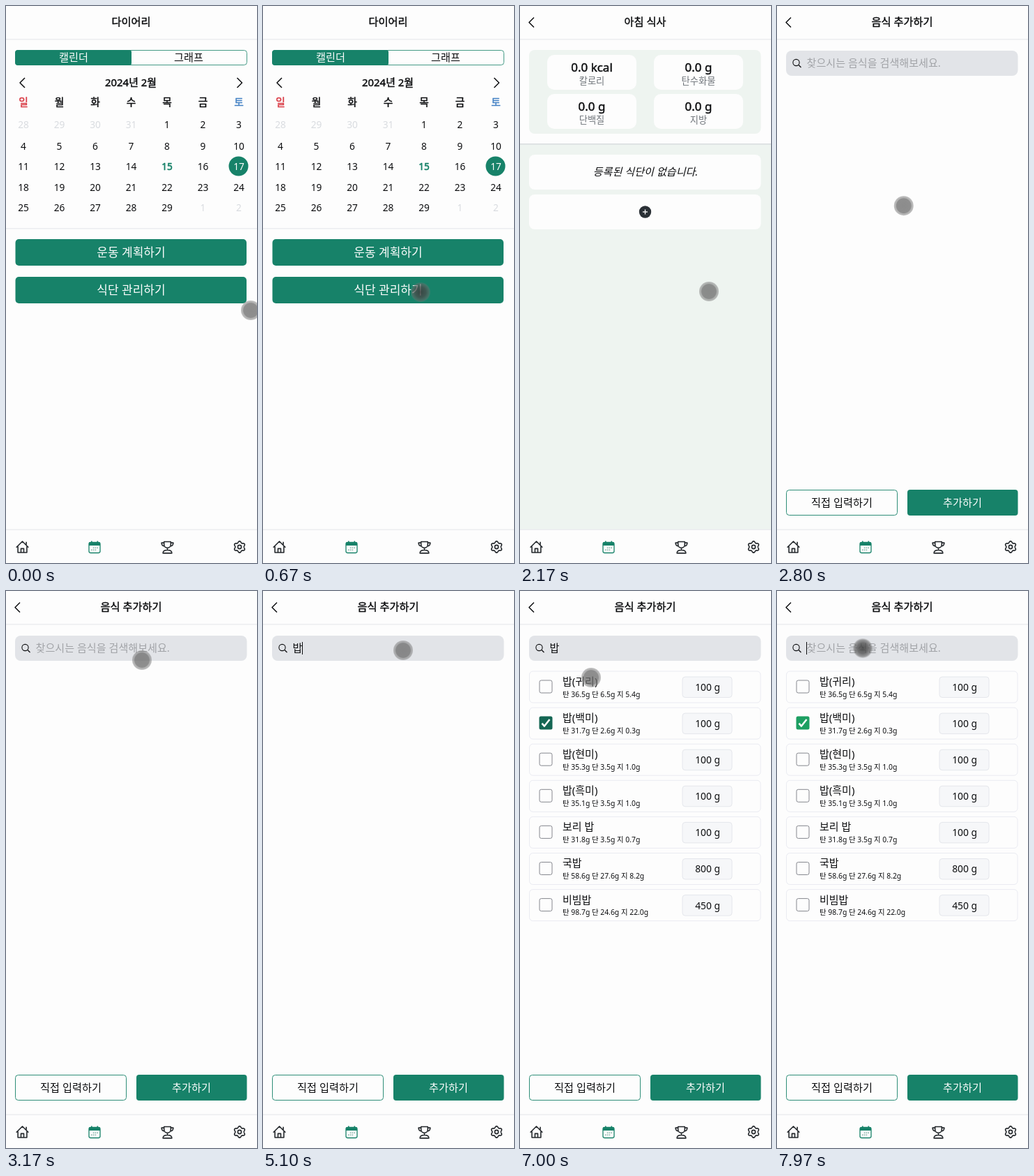
An HTML page with a canvas for the animation above (8 s loop, 360 by 798 pixels).

```html
<!DOCTYPE html>
<html lang="ko">
<head>
<meta charset="utf-8">
<title>다이어리</title>
<style>
html, body { margin: 0; width: 100%; height: 100%; overflow: hidden; background: #fdfdfd; }
canvas { display: block; width: 360px; height: 798px; }
</style>
</head>
<body>
<canvas id="stage"></canvas>
<script>
const W = 360, H = 798, LOOP = 8000;
const BG = '#fdfdfd', GREY = '#eef4f0', LINE = '#ecedf0', BAR = '#e1e4e6';
const GREEN = '#178269', INK = '#0d0e10', DARK = '#24282c', MUTED = '#6f747a';
const FONT = '"Noto Sans", "Noto Sans CJK KR", "Noto Sans CJK", sans-serif';
const canvas = document.getElementById('stage');
const c = canvas.getContext('2d');
const dpr = window.devicePixelRatio || 1;
canvas.width = W * dpr;
canvas.height = H * dpr;

// Text is placed by its visual centre line; `heavy` thickens the strokes by that many pixels.
function text(s, x, y, size, { color = INK, heavy = 0, align = 'center', style = '' } = {}) {
  c.font = `${style} ${size}px ${FONT}`;
  c.textAlign = align;
  c.fillStyle = c.strokeStyle = color;
  c.fillText(s, x, y + size * 0.36);
  if (heavy) {
    c.lineWidth = heavy;
    c.strokeText(s, x, y + size * 0.36);
  }
}
const SEMI = 0.45, BOLD = 0.6;

function box(x, y, w, h, r, fill, stroke, lw = 1) {
  c.beginPath();
  c.roundRect(x, y, w, h, r);
  if (fill) { c.fillStyle = fill; c.fill(); }
  if (stroke) { c.strokeStyle = stroke; c.lineWidth = lw; c.stroke(); }
}
function rect(x, y, w, h, color) {
  c.fillStyle = color;
  c.fillRect(x, y, w, h);
}
function disc(x, y, r, color) {
  c.beginPath();
  c.arc(x, y, r, 0, Math.PI * 2);
  c.fillStyle = color;
  c.fill();
}
function line(points, color = INK, lw = 1.5) {
  c.beginPath();
  points.forEach(([x, y]) => c.lineTo(x, y));
  c.strokeStyle = color;
  c.lineWidth = lw;
  c.stroke();
}
function chevron(x, y, dir, w = 7, h = 7) {
  line([[x - dir * w / 2, y - h], [x + dir * w / 2, y], [x - dir * w / 2, y + h]]);
}
// Path on a 24-unit grid, centred on x, y.
function icon(d, x, y, scale, { fill, stroke = DARK, lw = 2 } = {}) {
  c.save();
  c.translate(x, y);
  c.scale(scale, scale);
  c.translate(-12, -12);
  const p = new Path2D(d);
  if (fill) { c.fillStyle = fill; c.fill(p); }
  else { c.strokeStyle = stroke; c.lineWidth = lw; c.stroke(p); }
  c.restore();
}

const PATHS = {
  home: 'M1 13L12 2l11 11M4 11v11h16V11M9.5 22v-7h5v7M19 8V3',
  cup: 'M6 2h12v5a6 6 0 0 1-12 0zM6 4H1.500c0 4 2 6 6 6.500M18 4h4.500c0 4-2 6-6 6.500M12 13v4M4 22.500c0-4 3-5.500 8-5.500s8 1.500 8 5.500z',
  refresh: 'M23 3v7h-7M1 21v-7h7M3.5 9a9 9 0 0 1 14.9-3.4L23 10M1 14l4.6 4.4A9 9 0 0 0 20.5 15',
  bowl: 'M1 12h22c0 5-3 8-6 9v2H7v-2c-3-1-6-4-6-9zM3 10c0-3 3-5 5-5 1-3 7-3 8 0 3 0 5 2 5 5z',
  meat: 'M1 17l4-2C5 11 10 6 16 7l2-4 2 1 1 3 3 1-1 3-4 1c0 4-6 8-10 7l-3 4-2-1 0-3-3 0z',
  cheese: 'M1 10C4 5 10 2 15 2c4 0 7 4 8 8zM1 12h22v10H1z'
};

function gear(x, y) {
  c.beginPath();
  for (let i = 0; i <= 72; i++) {
    const a = i * Math.PI / 36, r = 7.2 - 1.1 * Math.cos(6 * a);
    c.lineTo(x + r * Math.cos(a), y + r * Math.sin(a));
  }
  c.strokeStyle = DARK;
  c.lineWidth = 1.6;
  c.stroke();
  c.beginPath();
  c.arc(x, y, 2.6, 0, Math.PI * 2);
  c.stroke();
}
function calendarIcon(x, y, color, solid) {
  box(x - 8, y - 7, 16, 15, 2.5, solid ? color : BG, color, 1.3);
  rect(x - 8, y - 7, 16, 4.5, color);
  rect(x - 5, y - 9, 1.6, 3, color);
  rect(x + 3.5, y - 9, 1.6, 3, color);
  if (solid) rect(x - 7, y - 3, 14, 1, BG);
  for (let i = 1; i < 7; i++)
    rect(x - 5 + (i % 4) * 2.8, y + (i < 4 ? 0 : 3), 1.6, 1.6, solid ? BG : '#86b3a8');
}

function frame(title, back) {
  rect(0, 0, W, H, BG);
  text(title, 179.5, 23, 15.2, { heavy: SEMI });
  rect(0, 47, W, 1.5, LINE);
  if (back) chevron(16.5, 23.5, -1);
}
function nav() {
  rect(0, 751, W, 47, BG);
  rect(0, 749.5, W, 1.5, LINE);
  icon(PATHS.home, 23.5, 775, 0.8);
  calendarIcon(127, 775.5, GREEN, false);
  icon(PATHS.cup, 231.5, 775.5, 0.8);
  gear(335, 775);
}

const DAYS = [...'일월화수목금토'];
function weekdays(x0, step) {
  DAYS.forEach((d, i) => text(d, x0 + i * step, 138, 14.8,
    { heavy: SEMI, color: i === 0 ? '#d93a44' : i === 6 ? '#4280c4' : INK }));
}
function segments() {
  frame('다이어리');
  box(13.5, 63.5, 332, 21, 4, BG, GREEN, 0.8);
  box(13, 63, 167, 22, [4, 3, 3, 4], GREEN);
  text('캘린더', 97, 74, 15.2, { color: BG });
  text('그래프', 262, 74, 15.2);
}

function monthScreen() {
  segments();
  chevron(23.5, 110, -1);
  chevron(335, 110, 1);
  text('2024년 2월', 179, 110, 14.9, { heavy: SEMI });
  weekdays(25, 51.5);
  const rows = [170, 201, 230, 260, 289];
  for (let i = 0; i < 35; i++) {
    const date = new Date(2024, 0, 28 + i), day = date.getDate(), inMonth = date.getMonth() === 1;
    const x = 25 + (i % 7) * 51.5, y = rows[Math.floor(i / 7)];
    const picked = inMonth && day === 17, today = inMonth && day === 15;
    if (picked) disc(x - 0.5, y - 0.5, 14, GREEN);
    text(day, x, y, 13.7, {
      heavy: today ? BOLD : 0,
      color: picked ? BG : today ? GREEN : inMonth ? INK : '#d9dce0'
    });
  }
  rect(0, 318, W, 1.5, LINE);
  box(13.5, 334, 331.5, 38, 5, GREEN);
  text('운동 계획하기', 179.5, 353, 17, { color: BG });
  box(13.5, 388, 331.5, 38, 5, GREEN);
  text('식단 관리하기', 179.5, 407, 17, { color: BG });
}

const EMOJI = [
  (x, y) => {
    disc(x - 2.4, y + 1, 5, '#d9302c');
    disc(x + 2.4, y + 1, 5, '#c92826');
    line([[x, y - 3], [x + 1, y - 7]], '#6b4a2c', 1.2);
    disc(x + 3, y - 5, 1.6, '#5d9a42');
  },
  (x, y) => {
    for (let i = 0; i < 12; i++) {
      const a = i * Math.PI / 6;
      disc(x + 6 * Math.cos(a), y + 6 * Math.sin(a), 1.5, '#f0a52e');
    }
    disc(x, y, 5.4, '#fbc53d');
  },
  (x, y) => {
    c.beginPath();
    c.arc(x - 1.5, y - 1, 7.3, -0.9, 2.5);
    c.quadraticCurveTo(x + 4, y + 4, x + 3, y - 6.7);
    c.fillStyle = '#f6c541';
    c.fill();
  },
  (x, y) => {
    disc(x, y, 7, '#d08d50');
    for (let i = 0; i < 6; i++) disc(x + 4.2 * Math.cos(i * 1.05), y + 4.2 * Math.sin(i * 1.05), 1.2, '#70402c');
    disc(x, y, 1.2, '#70402c');
  }
];

function dietScreen() {
  segments();
  calendarIcon(23.5, 110.5, INK, true);
  text('2월 17일', 179.5, 110, 14.8, { heavy: SEMI });
  icon(PATHS.refresh, 335, 110, 0.75, { stroke: INK });
  weekdays(53, 42.15);
  chevron(22.5, 152, -1, 6, 6);
  chevron(335.5, 152, 1, 6, 6);
  for (let i = 0; i < 7; i++) {
    const x = 53 + i * 42.15;
    if (i === 6) disc(x - 0.3, 170, 14, GREEN);
    text(11 + i, x, 170, 13.7, { color: i === 6 ? BG : INK });
  }
  rect(0, 199, W, 521, GREY);
  text('2월 17일 토 - 식단', 13, 217, 14.7, { heavy: 0.3, align: 'left' });
  box(13, 235, 332.5, 35, 9, BG);
  text('총 칼로리', 78, 253, 15, { heavy: SEMI });
  rect(128.5, 241, 3, 23, BAR);
  text('0.0 kcal', 181, 253, 13.6, { heavy: SEMI });
  box(13, 277, 332.5, 88, 10, BG);
  rect(124, 291, 3, 59, BAR);
  rect(235.5, 291, 3, 59, BAR);
  [['탄수화물', 68.5, '#f3f3f1', 'bowl'], ['단백질', 181, '#faf3e5', 'meat'], ['지방', 291.5, '#f6e6e5', 'cheese']]
    .forEach(([name, x, color, art]) => {
      disc(x, 320.5, 38.3, color);
      icon(PATHS[art], x, 301.5, 0.77, { fill: DARK });
      if (art === 'cheese') [[-3, 303], [3, 306], [5, 301]].forEach(([dx, y]) => disc(x + dx, y, 1.7, color));
      text('0.0g', x, 323, 13.6, { heavy: SEMI });
      text(name, x, 342, 13.3, { color: MUTED });
    });
  ['아침', '점심', '저녁', '기타'].forEach((meal, i) => {
    const y = 372 + i * 73.3;
    box(13, y, 332.5, 66, 9, BG);
    EMOJI[i](37, y + 25);
    text(meal + ' 식사', 50.5, y + 24.5, 15.3, { heavy: SEMI, align: 'left' });
    text('0.0kcal / 0.0g / 0.0g / 0.0g', 26.5, y + 44, 11.8, { color: MUTED, align: 'left' });
    chevron(321, y + 32.5, 1, 7.5, 7);
  });
}

function mealScreen() {
  frame('아침 식사', true);
  box(13, 63, 332.5, 120, 8, GREY);
  ['칼로리', '탄수화물', '단백질', '지방'].forEach((name, i) => {
    const x = 39 + (i % 2) * 153, y = 70 + (i > 1 ? 56 : 0);
    box(x, y, 128, 50, 10, BG);
    text(i ? '0.0 g' : '0.0 kcal', x + 64, y + 18, 17, { heavy: SEMI });
    text(name, x + 64, y + 37, 13.3, { color: MUTED });
  });
  rect(0, 198, W, 553, GREY);
  rect(0, 197, W, 1.5, '#d9dddf');
  box(13, 213, 332.5, 50, 8, BG);
  text('등록된 식단이 없습니다.', 180, 238, 15.1, { style: 'italic' });
  box(13, 270, 332.5, 50, 8, BG);
  disc(179.5, 295, 8.7, '#2a3036');
  line([[176, 295], [183, 295]], BG, 1.3);
  line([[179.5, 291.5], [179.5, 298.5]], BG, 1.3);
}

const FOODS = [
  ['밥(귀리)', 36.5, 6.5, 5.4, 100], ['밥(백미)', 31.7, 2.6, 0.3, 100],
  ['밥(현미)', 35.3, 3.5, 1, 100], ['밥(흑미)', 35.1, 3.5, 1, 100],
  ['보리 밥', 31.8, 3.5, 0.7, 100], ['국밥', 58.6, 27.6, 8.2, 800], ['비빔밥', 98.7, 24.6, 22, 450]
];
const FOCUS = 3480, RESULTS = 5450, CHECK = 6280, REFOCUS = 7480;
const TYPED = [[0, ''], [4400, 'ㅂ'], [4600, '바'], [4800, '밥'], [7720, '']];

function checkbox(y, t) {
  if (t === null) return box(28, y - 9, 18, 18, 2.5, BG, '#85878e');
  box(27.5, y - 9.5, 19, 19, 2.5, t < REFOCUS ? '#146653' : '#1d9f62');
  line([[31.5, y + 0.5], [35, y + 4.5], [42.5, y - 5]], BG, 2.5);
}
function foodRow([name, carbs, protein, fat, grams], i, t) {
  const y = 115 + i * 52.1;
  box(13.5, y, 331.5, 45, 5, null, '#eaebf2');
  checkbox(y + 22, i === 1 && t >= CHECK ? t : null);
  text(name, 61, y + 14.5, 15, { align: 'left' });
  const [a, b, d] = [carbs, protein, fat].map(n => n.toFixed(1));
  text(`탄 ${a}g 단 ${b}g 지 ${d}g`, 61, y + 33, 10.4, { align: 'left' });
  box(233, y + 8, 71, 29.5, 4, '#f6f7f9', '#e5e7ec');
  text(grams + ' g', 269, y + 23, 13.8);
}
function addScreen(t) {
  frame('음식 추가하기', true);
  box(13, 64, 332.5, 36, 8, '#e2e4e8');
  c.beginPath();
  c.arc(27.5, 81, 4.6, 0, Math.PI * 2);
  c.strokeStyle = INK;
  c.lineWidth = 1.1;
  c.stroke();
  line([[31, 84.5], [34.5, 88]], INK, 1.2);

  const [since, query] = TYPED.findLast(k => t >= k[0]);
  text(query || '찾으시는 음식을 검색해보세요.', 42.5, 82, 15.1, { align: 'left', color: query ? INK : '#a1a3a7' });
  const focused = (t >= FOCUS && t < CHECK - 80) || t >= REFOCUS;
  const start = Math.max(since, t >= REFOCUS ? REFOCUS : FOCUS);
  if (focused && (t - start) % 1060 < 530) rect(query ? 56 : 42, 73, 1, 18, INK);

  if (t >= RESULTS) FOODS.forEach((f, i) => foodRow(f, i, t));
  box(13.5, 693.5, 159, 36, 4, BG, GREEN, 0.9);
  text('직접 입력하기', 93, 711.5, 15.2);
  box(187, 693, 158.5, 37, 4, GREEN);
  text('추가하기', 266, 711.5, 15.2, { color: BG });
}

const MOVES = [
  [0, 351, 436], [500, 226, 410], [720, 226, 410], [1100, 222, 423], [1740, 222, 423], [2170, 271, 409],
  [2560, 181, 297], [2740, 181, 297], [3170, 195, 99], [3400, 201, 85], [5300, 201, 85],
  [6050, 38, 189], [6480, 38, 189], [7000, 102, 124], [7350, 123, 82], [LOOP, 123, 82]
];
const PRESSES = [[600, 720], [1620, 1740], [2620, 2740], [3400, 3500], [6180, 6280], [7380, 7480], [7880, LOOP]];

function cursor(t) {
  const i = MOVES.findIndex(m => m[0] > t);
  const [t0, x0, y0] = MOVES[i - 1], [t1, x1, y1] = MOVES[i];
  const p = (t - t0) / (t1 - t0), e = p * p * (3 - 2 * p);
  const x = x0 + (x1 - x0) * e, y = y0 + (y1 - y0) * e;
  const down = PRESSES.some(([a, b]) => t >= a && t < b);
  const g = c.createRadialGradient(x, y, 0, x, y, 14);
  const stops = down
    ? [[0, 'rgba(60,60,60,.86)'], [0.55, 'rgba(75,75,75,.76)'], [0.85, 'rgba(100,100,100,.6)'], [1, 'rgba(120,120,120,.2)']]
    : [[0, 'rgba(108,108,108,.78)'], [0.74, 'rgba(108,108,108,.76)'], [0.8, 'rgba(125,125,125,.62)'], [1, 'rgba(135,135,135,.5)']];
  stops.forEach(s => g.addColorStop(...s));
  disc(x, y, 14, g);
}

function draw(now) {
  const t = now % LOOP;
  c.setTransform(dpr, 0, 0, dpr, 0, 0);
  c.lineJoin = 'round';
  if (t < 720) monthScreen();
  else if (t < 1740) dietScreen();
  else if (t < 2740) mealScreen();
  else addScreen(t);
  nav();
  cursor(t);
}
const begin = performance.now();
function tick() {
  draw(performance.now() - begin);
  requestAnimationFrame(tick);
}
tick();
</script>
</body>
</html>
```
